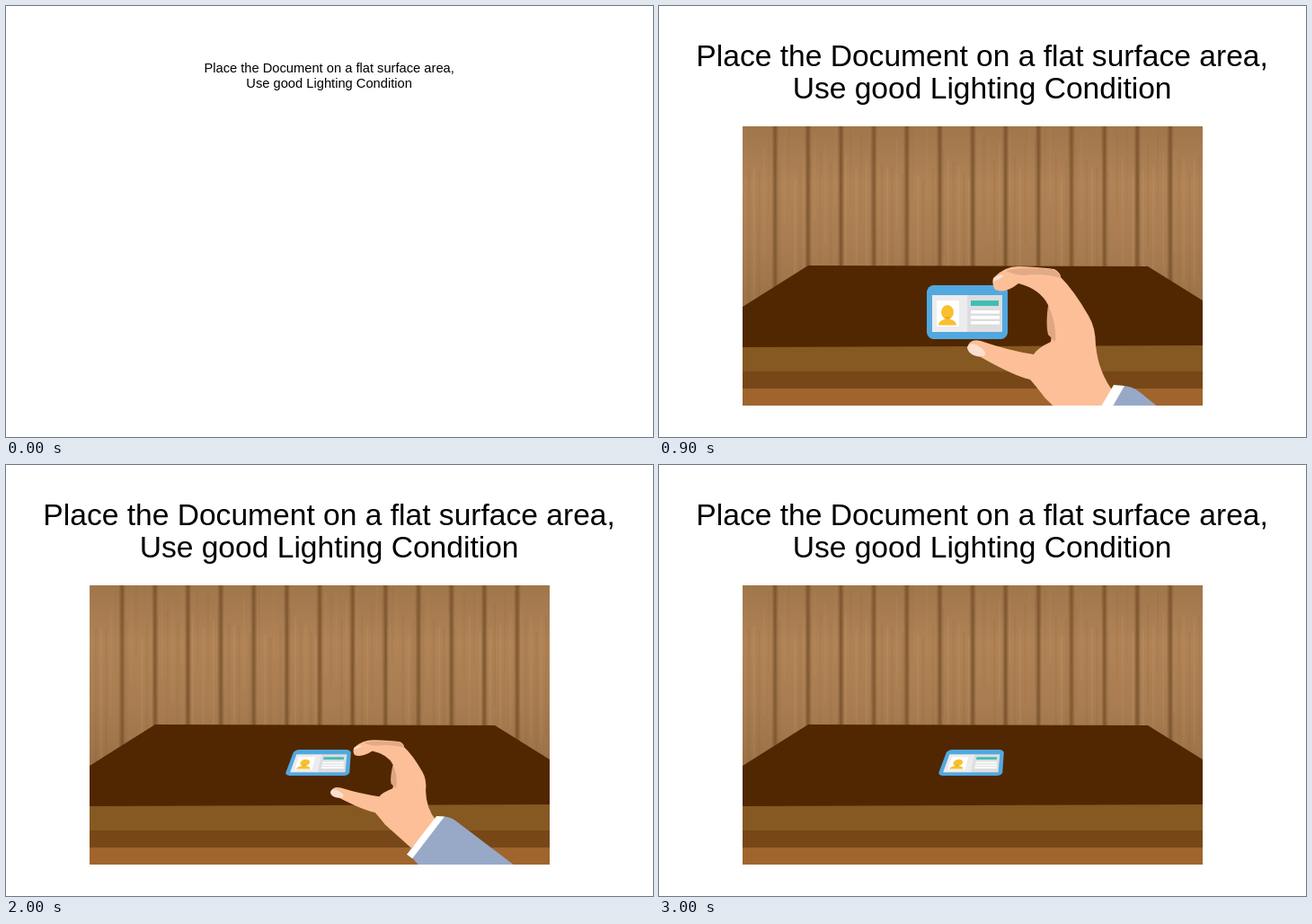
Animation, 720 px wide and 480 px high, one loop 3250 ms. Source, as an HTML page with a canvas:

```html
<!DOCTYPE html>
<html lang="en">
<head>
<meta charset="utf-8">
<style>
html, body { margin: 0; width: 100%; height: 100%; overflow: hidden; background: #fff; }
canvas { display: block; }
</style>
</head>
<body>
<canvas id="stage" width="720" height="480"></canvas>
<script>
const ctx = document.getElementById('stage').getContext('2d');
const LOOP = 3250;
const mix = (a, b, k) => a + (b - a) * k;

function fill(path, color) {
  ctx.fillStyle = color;
  ctx.fill(new Path2D(path));
}

function gradient(x0, y0, x1, y1, ...colors) {
  const g = ctx.createLinearGradient(x0, y0, x1, y1);
  colors.forEach((c, i) => g.addColorStop(i / (colors.length - 1), c));
  return g;
}

function drawText(t) {
  const k = Math.min(4, Math.floor(t / 100)) / 4;
  ctx.font = mix(14.7, 33.6, k) + 'px "Liberation Sans", Arial, sans-serif';
  ctx.textAlign = 'center';
  ctx.fillStyle = '#000';
  ctx.fillText('Place the Document on a flat surface area,', 359.6, mix(74, 66.5, k));
  ctx.fillText('Use good Lighting Condition', 359.6, mix(91, 103, k));
}

function drawRoom() {
  ctx.fillStyle = gradient(0, 134, 0, 330, '#a0764b', '#b08356', '#a97d51', '#9b7247');
  ctx.fillRect(93, 134, 512, 250);
  // faint wood grain
  for (let i = 0; i < 90; i++) {
    const r = Math.abs(Math.sin(i * 91.7) * 437.5) % 1;
    ctx.fillStyle = i % 2 ? 'rgba(90,50,10,.05)' : 'rgba(255,220,170,.05)';
    ctx.fillRect(93 + i * 5.7, 134 + r * 60, 1 + r * 2, 80 + r * 100);
  }
  // gaps between planks
  for (let i = 1; i < 14; i++) {
    const x = 92.5 + 36.65 * i;
    ctx.fillStyle = gradient(x - 4, 0, x + 4, 0, 'rgba(110,72,35,0)', 'rgba(110,72,35,.75)', 'rgba(110,72,35,0)');
    ctx.fillRect(x - 4, 134, 8, 200);
  }
  fill('M166 289L544 290L605 328V379L93 381V335Z', '#502700');
  fill('M93 380L605 378V407H93Z', '#865822');
  fill('M93 407H605V426H93Z', '#774717');
  fill('M93 426H605V445H93Z', '#a0652d');
}

// Card corners (TL, TR, BR, BL): upright, tilted, lying
const cards = [
  [298, 311, 388, 311, 388, 371, 298, 371],
  [315, 313, 377, 313, 371, 349, 306, 348],
  [321, 317, 384, 317, 382, 346, 310, 346]
];

function drawCard(pose) {
  const i = Math.min(1, Math.floor(pose));
  const q = cards[i].map((v, n) => mix(v, cards[i + 1][n], pose - i));
  // Card units are 90 by 60
  const at = (x, y) => [0, 1].map(n =>
    mix(mix(q[n], q[2 + n], x / 90), mix(q[6 + n], q[4 + n], x / 90), y / 60));
  const poly = (points, color) =>
    fill('M' + points.map(p => at(...p)).join('L') + 'Z', color);
  const rect = (x, y, w, h, color) =>
    poly([[x, y], [x + w, y], [x + w, y + h], [x, y + h]], color);
  const arc = (cx, cy, rx, ry, from, to) => Array.from({ length: 13 }, (_, n) => {
    const a = mix(from, to, n / 12) * Math.PI;
    return [cx + rx * Math.cos(a), cy + ry * Math.sin(a)];
  });
  poly([[8, 8, 1], [82, 8, 1.5], [82, 52, 0], [8, 52, .5]].flatMap(([x, y, a]) =>
    arc(x, y, 8, 8, a, a + .5)), '#52a9df');
  rect(6, 11, 40, 41, '#ececee');
  rect(45, 11, 39, 41, '#dcdde0');
  rect(11, 17, 25, 29, '#fff');
  poly(arc(23, 30, 7, 8, 0, 2), '#f8c02f');
  rect(20.5, 35, 5, 5, '#eda924');
  poly(arc(23, 44.5, 10, 7, 1, 2), '#f8c02f');
  rect(49, 17, 31, 6, '#42bdb1');
  for (const y of [28, 34, 40]) rect(49, y, 32, 3.5, '#fff');
}

function drawHand(x, y, k, turn) {
  ctx.save();
  ctx.translate(x, y);
  ctx.rotate(turn);
  ctx.transform(1 - .259 * k, 0, -.063 * k, 1 - .359 * k, 0, 0);
  ctx.translate(-343, -380);
  fill('M372 303Q384 290 400 290Q425 291 440 293Q447 297 447 302Q462 317 478 345Q486 358 486 378' +
    'Q489 408 506 430L473 478L430 437Q420 424 413 416Q395 412 358 391Q345 389 343 381' +
    'Q345 370 358 373Q390 384 417 388Q421 381 436 374Q439 358 433 333Q424 315 400 309' +
    'Q385 321 374 316Q370 310 372 303Z', '#fdbf98');
  fill('M386 295Q400 290 437 293Q446 296 447 303Q428 297 405 300Q394 299 386 295Z', '#e2ab88');
  fill('M433 333Q430 355 433 366L441 374Q443 355 433 333Z', '#dfa683');
  fill('M343 380Q347 373 356 379Q366 385 362 390Q345 391 343 380Z', '#fbdfd1');
  fill('M372 304Q377 298 384 300Q379 305 372 307Z', '#fbdfd1');
  fill('M513 423Q525 422 535 430L628 506L790 640H600L476 495Z', '#97a9c7');
  fill('M467 489L506 422L518 423L476 496Z', '#fff');
  ctx.restore();
}

// Start time, thumb x, thumb y, reach, turn, card pose
const poses = [
  [900, 343, 380, 0, 0, 0],
  [1250, 340, 368, .5, .03, .5],
  [1500, 337, 356, 1, .06, 1],
  [1750, 347, 360, 1, .03, 2],
  [2000, 361, 364, 1, 0, 2],
  [2250, 389, 383, 1, -.01, 2],
  [2500, 421, 405, 1, -.02, 2],
  [2750, 466, 438, 1, -.02, 2],
  [3000, 600, 600, 1, 0, 2]
];

function draw(t) {
  ctx.fillStyle = '#fff';
  ctx.fillRect(0, 0, 720, 480);
  drawText(t);
  const pose = poses.filter(p => p[0] <= t).pop();
  if (!pose) return;
  const [, x, y, reach, turn, card] = pose;
  ctx.save();
  ctx.beginPath();
  ctx.rect(93, 134, 512, 311);
  ctx.clip();
  drawRoom();
  drawCard(card);
  drawHand(x, y, reach, turn);
  ctx.restore();
}

const start = performance.now();
function tick() {
  draw((performance.now() - start) % LOOP);
  requestAnimationFrame(tick);
}
tick();
</script>
</body>
</html>
```
